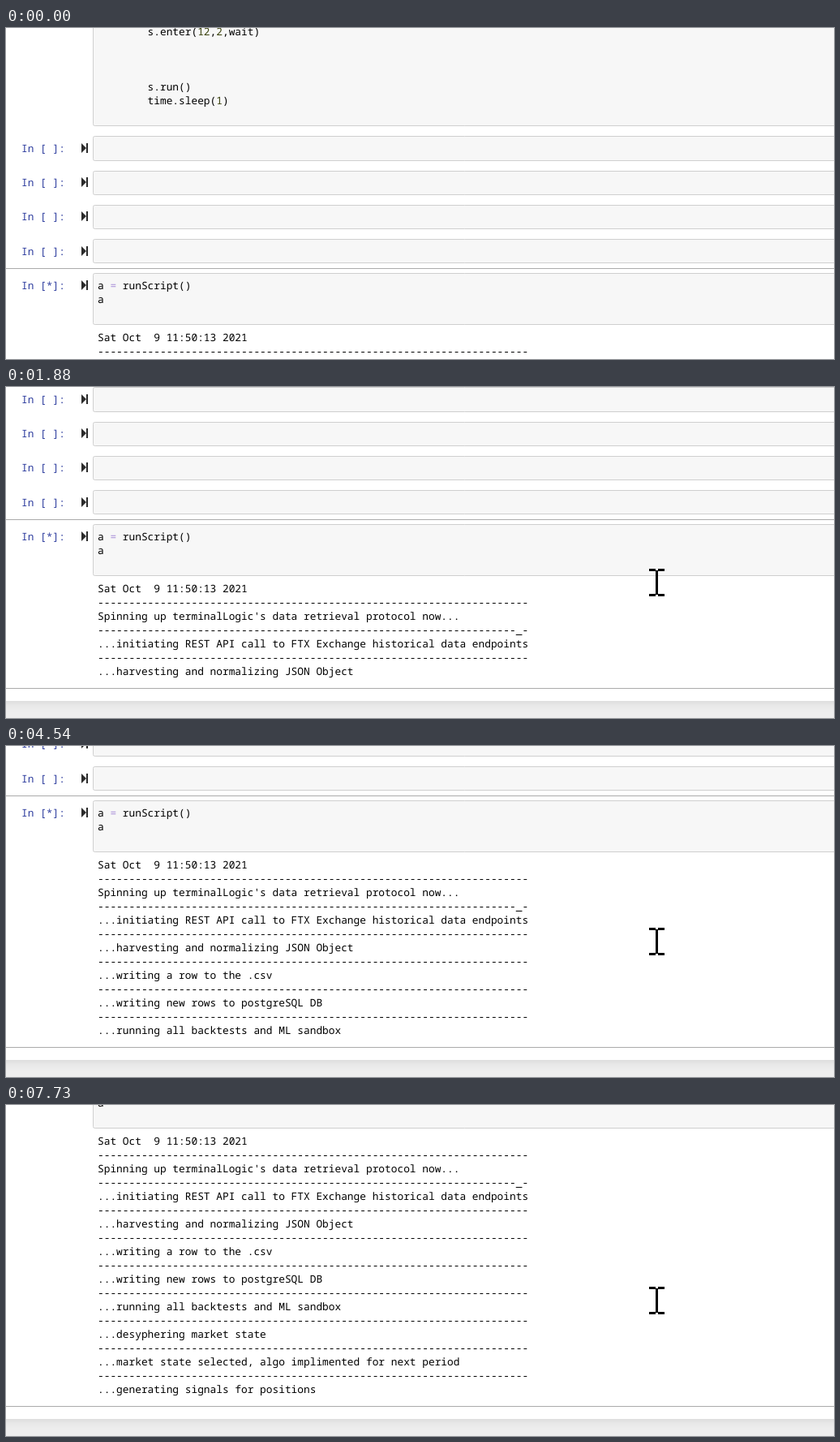
These frames come from a looping animation (1021x408 px, 8 s). An HTML page with a canvas:

```html
<!DOCTYPE html>
<html lang="en">
<head>
<meta charset="utf-8">
<title>Notebook run</title>
<style>
html, body { margin: 0; width: 100%; height: 100%; overflow: hidden; background: #fff; }
canvas { display: block; }
</style>
</head>
<body>
<canvas id="stage" width="1021" height="408"></canvas>
<script>
const W = 1021, H = 408, LOOP = 8000;
const COL = 7.697, LINE = 17, CODE_X = 113;
const CELL_PITCH = 42.2, CELL_HEIGHT = 30.2;
const START_Y = 317, LAST_LINE_Y = 350, OUTPUT_TOP = 64;
const FIRST_PRINT = 1412, PRINT_GAP = 997, TICK = 60;
const ctx = document.getElementById('stage').getContext('2d');

const DASHES = '-'.repeat(69);
const messages = [
  "Spinning up terminalLogic's data retrieval protocol now...",
  '...initiating REST API call to FTX Exchange historical data endpoints',
  '...harvesting and normalizing JSON Object',
  '...writing a row to the .csv',
  '...writing new rows to postgreSQL DB',
  '...running all backtests and ML sandbox',
  '...desyphering market state',
  '...market state selected, algo implimented for next period',
  '...generating signals for positions'
];

// Each scroll to the page end: start time and number of jumps
const scrolls = [
  [550, 2], [1750, 3], [2410, 2], [4210, 2],
  [4420, 3], [5680, 1], [6410, 2], [7730, 1]
];

// Two messages are there at first, then one more per second
function printed(t) {
  return 2 + Math.max(0, Math.floor((t - FIRST_PRINT) / PRINT_GAP) + 1);
}

function outputHeight(count) {
  return OUTPUT_TOP + 2 * LINE * count;
}

// y of the running cell's first line
function cellY(t) {
  let y = START_Y;
  for (const [begin, jumps] of scrolls) {
    if (t < begin) break;
    const jump = Math.floor((t - begin) / TICK) + 1;
    const progress = Math.min(1, jump / jumps) ** 3;
    const end = LAST_LINE_Y - outputHeight(printed(begin));
    y += (end - y) * progress;
  }
  return Math.round(y);
}

function rect(x, y, w, h, color) {
  ctx.fillStyle = color;
  ctx.fillRect(x, y, w, h);
}

function text(str, x, midY, color = '#000') {
  ctx.fillStyle = color;
  ctx.fillText(str, x, midY + 5);
}

// Text in the code area, placed by character column
function code(str, col, midY, color) {
  text(str, CODE_X + col * COL, midY, color);
}

// Code with its numbers and operators tinted
function tintedCode(line, col, midY) {
  for (const { 0: part, index } of line.matchAll(/\d+|=|[^\d=]+/g)) {
    const color = part === '=' ? '#a98fd8' : /\d/.test(part) ? '#3c4410' : '#000';
    code(part, col + index, midY, color);
  }
}

function inputBox(top, bottom) {
  const y = Math.round(top);
  ctx.beginPath();
  ctx.roundRect(107.5, y + 0.5, W, Math.round(bottom) - y - 1, 2);
  ctx.fillStyle = '#f7f7f7';
  ctx.fill();
  ctx.strokeStyle = '#cfcfcf';
  ctx.lineWidth = 1;
  ctx.stroke();
}

function prompt(mark, y) {
  text(`In [${mark}]:`, 19, y, '#303f9f');
  ctx.fillStyle = '#2b2b2b';
  ctx.beginPath();
  ctx.moveTo(93, y - 6);
  ctx.lineTo(99, y);
  ctx.lineTo(93, y + 6);
  ctx.fill();
  ctx.fillRect(99, y - 6, 2, 12);
}

function page(bottom) {
  rect(0, 0, W, H, '#eee');
  ctx.save();
  ctx.shadowColor = 'rgba(87,87,87,0.22)';
  ctx.shadowBlur = 12;
  rect(-30, -30, W + 60, bottom + 30, '#fff');
  ctx.restore();
}

function upperCells(y) {
  inputBox(y - 596, y - 196);
  tintedCode('s.enter(12,2,wait)', 8, y - 313);
  tintedCode('s.run()', 8, y - 245);
  tintedCode('time.sleep(1)', 8, y - 228);

  for (let k = 0; k < 4; k++) {
    const top = y - 57 - CELL_PITCH * k;
    inputBox(top, top + CELL_HEIGHT);
    prompt(' ', Math.floor(top + 15));
  }
}

function runCell(y, count) {
  rect(0, y - 21, W, 1, '#ababab');
  rect(0, y + outputHeight(count) + 21, W, 1, '#ababab');
  inputBox(y - 15, y + 49);
  prompt('*', y);
  tintedCode('a = runScript()', 0, y);
  code('a', 0, y + LINE);

  code('Sat Oct  9 11:50:13 2021', 0, y + OUTPUT_TOP);
  messages.slice(0, count).forEach((message, i) => {
    const row = y + outputHeight(i) + LINE;
    code(i === 1 ? DASHES.slice(2) + '_-' : DASHES, 0, row);
    code(message, 0, row + LINE);
  });
}

function pointer(x, y) {
  for (const bar of [y, y + 31]) {
    rect(x, bar, 8, 3, '#000');
    rect(x + 11, bar, 8, 3, '#000');
  }
  rect(x + 8, y + 2, 3, 30, '#000');
}

function draw(t) {
  const y = cellY(t), count = printed(t);
  page(y + outputHeight(count) + 37);
  ctx.font = '12.83px "Noto Sans Mono", monospace';
  ctx.textRendering = 'geometricPrecision';
  upperCells(y);
  runCell(y, count);
  if (t >= 230) pointer(793, 224);
  else if (t >= 130) pointer(815, 235);
}

const start = performance.now();
function tick() {
  draw((performance.now() - start) % LOOP);
  requestAnimationFrame(tick);
}
tick();
</script>
</body>
</html>
```
